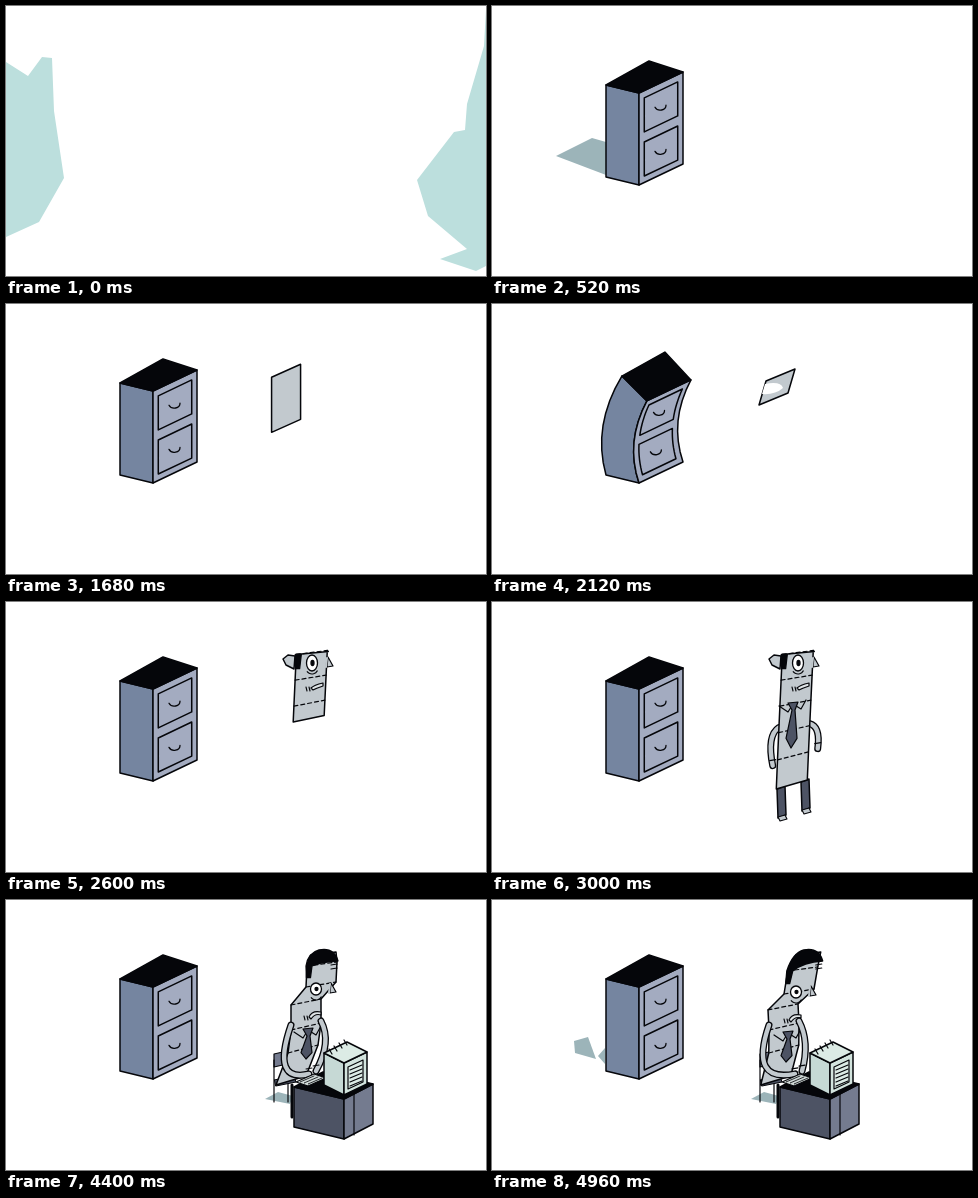
An HTML page with a canvas that plays this animation: 480 by 270 pixels, repeating every 5000 ms.

```html
<!DOCTYPE html>
<html lang="en">
<head>
<meta charset="utf-8">
<title>Filing cabinet</title>
<style>
  html, body { margin: 0; width: 100%; height: 100%; overflow: hidden; background: #fff; }
  canvas { display: block; width: 100vw; height: 100vh; }
</style>
</head>
<body>
<canvas id="stage"></canvas>
<script>
const LOOP = 5000;
const canvas = document.getElementById('stage');
const ctx = canvas.getContext('2d');
const dpr = window.devicePixelRatio || 1;
canvas.width = 480 * dpr;
canvas.height = 270 * dpr;

const INK = '#05060a', PAPER = '#c2c9ce', SLATE = '#4d5364', GREY = '#747b8f';
const SIDE = '#7585a0', FRONT = '#a3abc0', SHADE = '#9cb4b9', TEAL = '#bcdfdd';

/* ---------- time ---------- */
// Drawn on twos, with a few longer holds and two quick passages
function hold(t) {
  if (t === 3920) return 320;
  if ([0, 1080, 3400, 4400].includes(t)) return 120;
  return (t >= 2080 && t < 2200) || t >= 4760 ? 40 : 80;
}
const starts = [];
for (let t = 0; t < LOOP; t += hold(t)) starts.push(t);

const snap = t => starts.filter(s => s <= t).pop();
const lerp = (a, b, p) => a + (b - a) * p;
const mix = (a, b, p) => a.map((v, i) => lerp(v, b[i], p));
const add = ([x, y], dx, dy) => [x + dx, y + dy];
const ramp = (t, a, b) => Math.max(0, Math.min(1, (t - a) / (b - a)));
const smooth = p => p * p * (3 - 2 * p);
const overshoot = p => 1 + 2.7 * (p - 1) ** 3 + 1.7 * (p - 1) ** 2;
const span = n => Array.from({ length: n }, (_, i) => i);

/* ---------- drawing ---------- */
function stroke(width = 1.5, color = INK) {
  ctx.lineWidth = width;
  ctx.strokeStyle = color;
  ctx.stroke();
}
function paint(fill, width) {
  ctx.fillStyle = fill;
  ctx.fill();
  if (width) stroke(width);
}
function trace(points) {
  ctx.beginPath();
  points.forEach(p => ctx.lineTo(...p));
}
function poly(points, fill, width = 1.5) {
  trace(points);
  ctx.closePath();
  paint(fill, width);
}
function line(points, width = 1.2, color) {
  trace(points);
  stroke(width, color);
}
function dashes(points, pattern = [4, 3]) {
  ctx.setLineDash(pattern);
  line(points, 1.2);
  ctx.setLineDash([]);
}
function oval([x, y], rx, ry, fill) {
  ctx.beginPath();
  ctx.ellipse(x, y, rx, ry, 0, 0, 7);
  paint(fill, 1.3);
}
function growFrom(y, s, draw) {
  ctx.save();
  ctx.translate(0, y * (1 - s));
  ctx.scale(1, s);
  draw();
  ctx.restore();
}
// Sheared rectangle: corner, step across, step down
function slab(p, across, down, fill, width) {
  const q = add(p, ...across);
  poly([p, q, add(q, ...down), add(p, ...down)], fill, width);
}
// Block seen from its near edge, whose top is p
function block(p, left, right, height, [top, side, front]) {
  slab(p, left, [0, height], side);
  slab(p, right, [0, height], front);
  slab(p, left, right, top);
}

/* ---------- cabinet ---------- */
// u: 0 left, 1 near edge, 2 right; v: 0 top, 1 bottom
function skin(u, v, bend) {
  const w = 1 - v, side = Math.min(u, 1);
  const x = u < 1 ? lerp(114, 147, u) : lerp(147, 191, u - 1);
  const y = u < 1 ? lerp(79, 87, u) : lerp(87, 66, u - 1);
  const push = w * w * lerp(16, 8, side) - 28 * w * v;
  return [x + bend * push, y + 92 * v + bend * w * lerp(-7, 10, side)];
}
function panel(u0, u1, v0, v1, bend, fill) {
  const edge = u => span(9).map(i => skin(u, lerp(v0, v1, i / 8), bend));
  poly([...edge(u0), ...edge(u1).reverse()], fill);
}
function handle([x, y]) {
  ctx.beginPath();
  ctx.moveTo(x - 6, y - 1);
  ctx.bezierCurveTo(x - 3, y + 4, x + 5, y + 2, x + 5, y - 3);
  stroke(1.3);
}
function cabinet(bend, open) {
  panel(0, 1, 0, 1, bend, SIDE);
  panel(1, 2, 0, 1, bend, FRONT);
  const [a, b, c] = [0, 1, 2].map(u => skin(u, 0, bend));
  poly([a, [a[0] + c[0] - b[0] - 1, a[1] + c[1] - b[1] - 3], c, b], INK);
  for (const v of [.08, .56]) {
    const empty = open && v < .5;
    panel(1.12, 1.88, v, v + .37, bend, empty ? INK : FRONT);
    if (!empty) handle(skin(1.5, v + .2, bend));
  }
}

/* ---------- drawer ---------- */
function drawer(open, drawSheet) {
  const count = 30, end = [152 + 127 * open, 99 + 41 * open];
  span(count).forEach(i => {
    if (i === count - 4) drawSheet();
    const p = mix([153, 100], end, i / count);
    poly([p, add(p, 0, -8), add(p, 20, -17), add(p, 25, -8)], i % 2 ? '#cbd1d5' : '#e2e6e8', 1.2);
  });
  poly([[152, 100], end, add(end, 0, 22), [152, 121]], SIDE);
  const face = add(end, 0, -3);
  slab(face, [34, -15], [0, 31], FRONT);
  handle(add(face, 17, 11));
}

/* ---------- loose sheet ---------- */
// time, then corner x, corner y, slope, height, skew
const sheetKeys = [
  [840, 264, 120, -13, 16, 0], [1080, 264, 78, -13, 59, 0], [1840, 266, 72, -13, 54, 0],
  [2120, 274, 77, -12, 24, -7], [2440, 290, 50, -4, 26, -1]
];
function sheet(t) {
  const i = sheetKeys.findIndex(k => t < k[0]), a = sheetKeys[i - 1], b = sheetKeys[i];
  const [, x, y, slope, height, skew] = mix(a, b, ramp(t, a[0], b[0]));
  slab([x, y], [29, slope], [skew, height], PAPER);
  if (t < 2040 || t > 2200) return;
  ctx.beginPath();
  ctx.moveTo(x - 1, y + 3);
  ctx.quadraticCurveTo(x + 15, y, x + 17, y + 7);
  ctx.quadraticCurveTo(x + 9, y + 14, x - 4, y + 13);
  paint('#fff');
}

/* ---------- paper man: a strip with six folds ---------- */
const leaning = [[305, 55], [301, 66], [300, 87], [285, 105], [285, 130], [282, 153], [270, 185]];

function creases(head, lean, slump) {
  const left = leaning.map(([x, y], i) => {
    const up = Math.max(i, 1 - head);
    const upright = [291.5 - up * 1.2, 187 - 160 * (1 - up / 6) ** .95];
    const bowed = [x - 9 * slump * Math.sin(Math.PI * (i + .3) / 6.6),
                   y + 7 * slump * Math.max(0, Math.sin(Math.PI * i / 4))];
    return mix(upright, bowed, lean);
  });
  return left.map((p, i) => [p, add(p, i ? 31 - lean : 32 - 7 * head, -3 - i)]);
}
function hair([[p0, r0], [p1], [p2]], head) {
  const at = (p, dx, dy) => add(p, dx * head, dy * head);
  const nape = mix(p1, p2, .55);
  const tip = mix(p0, add(r0, 2, 9), head);
  ctx.beginPath();
  ctx.moveTo(...nape);
  ctx.lineTo(...add(p1, -1, 0));
  ctx.quadraticCurveTo(...at(p0, -3, -2), ...at(p0, 8, -5));
  ctx.quadraticCurveTo(...at(p0, 23, -8), ...tip);
  ctx.quadraticCurveTo(...at(p0, 8, 7), ...add(p1, 5, 0));
  ctx.lineTo(...add(nape, 4, 0));
  ctx.closePath();
  paint(INK, 1.3);
  if (head > .5) [3, 7].forEach(d => line([add(tip, -7, d + 1), add(tip, -1, d)]));
}
function face(eye, lean) {
  const nose = add(eye, 21 - lean, 3), mouth = add(eye, 5 - 6 * lean, 22 + 3 * lean);
  poly([add(nose, -5, -9), nose, add(nose, -6, 1)], PAPER, 1.2);
  line([add(nose, -6, -8), add(nose, -7, 1)], 2, PAPER);
  oval(eye, 5.5, 8 - 2 * lean, '#fff');
  oval(add(eye, .5, 0), 1.5, 2.5 - lean, INK);
  ctx.beginPath();
  ctx.arc(eye[0], eye[1] + 5, 6, .5, 2.5);
  stroke(1.1);
  ctx.beginPath();
  ctx.moveTo(...add(mouth, -6, 3));
  ctx.quadraticCurveTo(...add(mouth, -3, -4 * lean), ...add(mouth, 6, -2));
  ctx.lineTo(...add(mouth, 6, 1));
  ctx.quadraticCurveTo(...add(mouth, 0, 3 - 4 * lean), ...add(mouth, -4, 5));
  ctx.closePath();
  paint('#dfe4e6', 1.2);
  [-11, -8].forEach(d => line([add(mouth, d, 2), add(mouth, d + 1, 6)], 1.1));
}
function tie(knot, length) {
  const end = add(knot, -2, length), widest = length * .78;
  poly([add(knot, -5, -1), add(knot, 5, -2), add(knot, 2, 6), add(knot, 4, widest),
        end, add(knot, -7, widest), add(knot, -1, 6)], SLATE, 1.2);
}
function limb(shoulder, elbow, hand) {
  ctx.beginPath();
  ctx.moveTo(...shoulder);
  ctx.quadraticCurveTo(...elbow, ...hand);
  stroke(7);
  stroke(4.4, PAPER);
  line([add(hand, -3, -5), add(hand, 3, -6)], 1.1);
}
function arms(folds, lean, tap) {
  const [l, r] = folds[4], left = add(l, 0, -5), right = add(r, 0, -2);
  limb(left, add(left, -12 - 8 * lean, 8 + 50 * lean), mix(add(left, -6, 38), [303, 174 + tap], lean));
  limb(right, add(right, 11, 3 + 18 * lean), mix(add(right, 8, 25), [310, 171 - tap], lean));
}
function leg(p) {
  slab(p, [8, -3], [1, 29], SLATE);
  poly([add(p, 1, 28), add(p, 8, 26), add(p, 10, 30), add(p, 3, 32)], PAPER, 1.1);
}
function man(t) {
  const head = ramp(t, 3080, 3400);
  const lean = .06 * ramp(t, 3520, 3920) + .94 * smooth(ramp(t, 4160, 4400));
  const slump = smooth(ramp(t, 4400, 4960));
  const folds = creases(head, lean, slump);
  const eye = mix([306, 61], [310 - 6 * slump, 89 + 3 * slump], lean);
  const reach = lerp(2, 6, ramp(t, 2440, 2840)), whole = Math.floor(reach);
  const shown = folds.slice(0, whole + 1);
  if (whole < 6) shown.push(folds[whole].map((p, i) => mix(p, folds[whole + 1][i], reach - whole)));

  if (t >= 2840 && t < 3240) { leg([285, 187]); leg([309, 180]); }
  const tap = t > 4400 ? 1.5 * Math.cos(t / 40) : 0;
  const drawArms = () => { if (t >= 2760) arms(folds, lean, tap); };
  if (lean < .5) drawArms();
  poly([...shown.map(f => f[0]), ...shown.map(f => f[1]).reverse()], PAPER);
  shown.slice(1, -1).forEach(f => dashes(f));

  if (reach > 4) {
    const knot = add(eye, -5 - 3 * lean, 41);
    line([add(knot, -14, 2), add(knot, -5, 8), knot, add(knot, 8, 5), add(knot, 13, -4)]);
    tie(knot, 44 - 15 * lean);
  }
  if (t < 3160) poly([[289, 54], [282, 53], [277, 57], [280, 63], [288, 67]], PAPER);
  hair(folds, head);
  face(eye, lean);
  if (lean >= .5) drawArms();
}

/* ---------- furniture ---------- */
function chair() {
  slab([268, 154], [13, -3], [0, 13], GREY, 1.2);
  line([[268, 160], [268, 202]]);
  line([[282, 164], [282, 202]]);
  slab([268, 180], [20, -4], [2, 6], SLATE, 1);
  line([[286, 185], [286, 217]], 3);
}
function desk() {
  block([338, 199], [-50, -12], [29, -15], 40, [INK, SLATE, GREY]);
  line([[348, 194], [348, 235]]);
  slab([290, 182], [18, -8], [12, 4], '#d0d9d8', 1.1);
  span(3).forEach(i => line([[294 + 4 * i, 182 + i], [308 + 4 * i, 176 + i]], .8));
  block([338, 163], [-20, -10], [23, -11], 32, ['#dcebe5', '#c6d9d5', '#d3e4de']);
  slab([342, 167], [15, -7], [0, 22], '#dcebe5', 1.2);
  span(5).forEach(i => line([[344, 170 + 4 * i], [356, 165 + 4 * i]]));
  span(4).forEach(i => line([[323 + 5 * i, 149 - 3 * i], [326 + 5 * i, 154 - 3 * i]]));
}

/* ---------- scene ---------- */
function splash() {
  poly([[0, 56], [22, 70], [36, 51], [46, 52], [48, 105], [58, 172], [33, 216], [0, 231]], TEAL, 0);
  poly([[480, 3], [478, 40], [461, 98], [459, 124], [448, 126], [411, 174], [422, 210],
        [461, 243], [434, 253], [470, 265], [480, 260]], TEAL, 0);
}
function shadows(t) {
  if ((t >= 440 && t < 1680) || (t >= 3240 && t < 4320))
    poly([[64, 150], [100, 132], [114, 136], [114, 169]], SHADE, 0);
  if (t >= 4880) {
    poly([[82, 141], [96, 137], [104, 159], [83, 153]], SHADE, 0);
    poly([[106, 156], [113, 148], [113, 164]], SHADE, 0);
  }
  if (t >= 3360) poly([[259, 199], [272, 192], [287, 196], [284, 204]], SHADE, 0);
}
function render(t) {
  ctx.setTransform(dpr, 0, 0, dpr, 0, 0);
  ctx.fillStyle = '#fff';
  ctx.fillRect(0, 0, 480, 270);
  ctx.lineJoin = ctx.lineCap = 'round';
  if (t < 120) return splash();

  shadows(t);
  const open = t < 1200 ? overshoot(ramp(t, 680, 1080)) : 1 - smooth(ramp(t, 1200, 1520));
  const isOpen = open > .02;
  const bend = Math.sin(Math.PI * ramp(t, 1840, 2360));
  const drawSheet = () => { if (t >= 840 && t < 2440) sheet(t); };
  growFrom(180, overshoot(ramp(t, 0, 440)), () => cabinet(bend, isOpen));
  if (isOpen) drawer(open, drawSheet);
  else drawSheet();

  if (t >= 3240) chair();
  if (t >= 2440) man(t);
  if (t >= 3160) growFrom(239, overshoot(ramp(t, 3000, 3400)), desk);
  if (t >= 3520 && t < 4240) dashes([[402, 257], [444, 269]], [2, 5]);
}

const origin = performance.now();
function tick() {
  render(snap((performance.now() - origin) % LOOP));
  requestAnimationFrame(tick);
}
tick();
</script>
</body>
</html>
```
